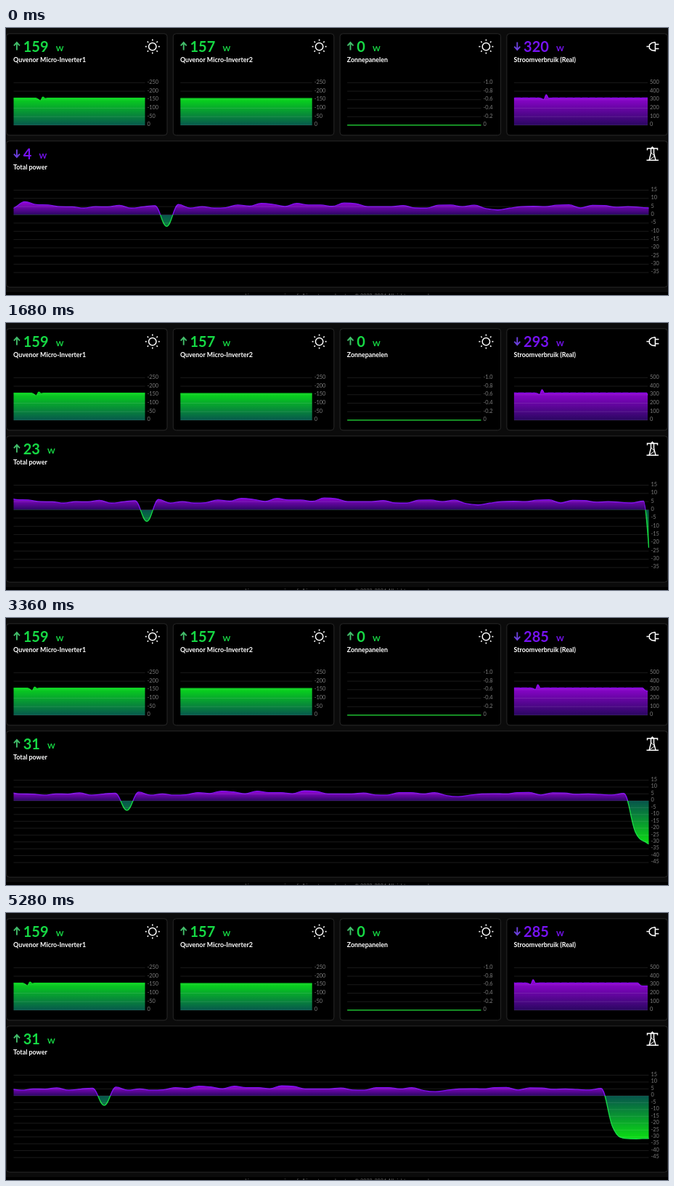
Write an HTML page with a canvas that moves like this. It is 912 px wide and 368 px high and loops after 5400 ms.

```html
<!DOCTYPE html>
<html lang="nl">
<head>
<meta charset="utf-8">
<title>Power dashboard</title>
<style>
  html, body { margin: 0; width: 912px; height: 368px; overflow: hidden; background: #0b0b0b; }
  canvas { display: block; }
</style>
</head>
<body>
<canvas id="stage" width="912" height="368"></canvas>
<script>
const ctx = document.getElementById('stage').getContext('2d');
const LOOP = 5400, STEP = 120;
const SAMPLE_MS = 1000;     // time between two measurements
const START = 40.76;        // sample index at the right edge when the loop starts
const SPAN = 53.7;          // samples across a chart
const RESCALE = 43;         // sample index at which the large axis grows
const FONT = 'Lato, sans-serif';
const GREEN = '#16d944', PURPLE = '#7612f2';

const clamp = v => Math.max(0, Math.min(1, v));
const mix = (a, b, p) => a + (b - a) * p;

// Total power in watts; the first entry is sample -14
const totals = [
  3.5, 4, 8, 6.2, 6, 5, 4.9, 4.1, 5, 4.9, 5.8, 4.1, 4.9, 5.6,
  -7, 6.3, 4.1, 5, 4.1, 4.4, 6, 5.3, 7, 6.4, 5.1, 7, 6, 6, 5.2,
  7.2, 6.8, 5, 5, 5, 5.7, 4.2, 4.1, 5.9, 6, 5, 5.9, 3.8, 3, 4.1, 5,
  5.2, 5, 5.9, 6.1, 4.2, 5.8, 5.7, 4.7, 5, 4.6, 4.2, 5.4,
  -23, -31, -31.4, -31, -31.4
];
const inverterBlip = { '-3': -153, '-2': -144, '-1': -166, '0': -157 };
const usageEvents = { '-2': 314, '-1': 303, '0': 360, '1': 317, '41': 320, '42': 321, '43': 293 };

const charts = [
  { title: 'Quvenor Micro-Inverter1', icon: sun, right: 191.5, hi: -250, lo: 0, ticks: 5,
    value: k => inverterBlip[k] ?? -159 },
  { title: 'Quvenor Micro-Inverter2', icon: sun, right: 421.7, hi: -250, lo: 0, ticks: 5,
    value: () => -157 },
  { title: 'Zonnepanelen', icon: sun, right: 654.5, hi: -1, lo: 0, ticks: 5, digits: 1,
    value: () => 0 },
  { title: 'Stroomverbruik (Real)', icon: plug, right: 884, hi: 500, lo: 0, ticks: 5,
    value: k => k > 43 ? 285 : usageEvents[k] ?? 320 + Math.sin(k * 2.1) }
].map((c, i) => ({ ...c, x: 1 + 229.8 * i, y: 8, w: 221, h: 140, top: 75.4, bottom: 133.9 }));

const totalChart = {
  x: 1, y: 156, w: 910.5, h: 201.4, title: 'Total power', icon: pylon,
  right: 885.5, top: 223.5, bottom: 337, hi: 15, lo: -35, ticks: 10, twoSided: true,
  value: k => totals[k + 14] ?? 4
};

function lines(width, ...paths) {
  ctx.lineWidth = width;
  ctx.beginPath();
  for (const [x, y, ...rest] of paths) {
    ctx.moveTo(x, y);
    for (let i = 0; i < rest.length; i += 2) ctx.lineTo(rest[i], rest[i + 1]);
  }
  ctx.stroke();
}

function text(str, x, y, size, color, weight = 400) {
  ctx.font = `${weight} ${size}px ${FONT}`;
  ctx.fillStyle = color;
  ctx.fillText(str, x, y);
  return ctx.measureText(str).width;
}

function sun(x, y) {
  ctx.lineWidth = 1.5;
  ctx.beginPath();
  ctx.arc(x, y, 5.2, 0, Math.PI * 2);
  ctx.stroke();
  for (let i = 0; i < 8; i++) {
    const c = Math.cos(i * Math.PI / 4), s = Math.sin(i * Math.PI / 4);
    lines(1.6, [x + 8 * c, y + 8 * s, x + 10 * c, y + 10 * s]);
  }
}

function plug(x, y) {
  lines(1.5, [x - 8, y, x - 4, y],
    [x + 4, y - 3, x + 9, y - 3], [x + 4, y + 3, x + 9, y + 3],
    [x + 4, y - 6, x + 4, y + 6, x - 1, y + 5, x - 4, y + 2.5, x - 4, y - 2.5, x - 1, y - 5, x + 4, y - 6]);
}

function pylon(x, y) {
  lines(1.5, [x - 7, y - 5, x - 7, y - 7.5, x + 7, y - 7.5, x + 7, y - 5],
    [x - 8, y + 8.7, x + 8.5, y + 8.7],
    [x - 2, y - 7.5, x, y - 9.5, x + 2, y - 7.5, x + 2, y - 1, x + 4.5, y + 8.5],
    [x - 2, y - 7.5, x - 2, y - 1, x - 4.5, y + 8.5]);
  lines(1, [x - 2, y - 2, x + 3, y + 3, x - 4, y + 8]);
}

function arrow(x, y, up) {
  const d = up ? 1 : -1;
  ctx.strokeStyle = up ? '#42bd6a' : '#6b40dc';
  lines(1.9, [x, y + 5.5 * d, x, y - 5 * d], [x - 4, y - 0.7 * d, x, y - 5 * d, x + 4, y - 0.7 * d]);
}

// Control points of a smoothed line that never overshoots its neighbours
function controls(prev, p, next) {
  const toward = (a, b) => (1.5 * a + b) / 2.5;
  const lx = toward(p.x, prev.x), rx = toward(p.x, next.x);
  let ly = toward(p.y, prev.y), ry = toward(p.y, next.y);
  if (rx !== lx) {
    const shift = (ry - ly) * (rx - p.x) / (rx - lx) + p.y - ry;
    ly += shift;
    ry += shift;
  }
  const bound = (v, a, b) => Math.max(Math.min(a, b), Math.min(Math.max(a, b), v));
  const left = bound(ly, prev.y, p.y);
  if (left !== ly) { ly = left; ry = 2 * p.y - ly; }
  const right = bound(ry, next.y, p.y);
  if (right !== ry) { ry = right; ly = 2 * p.y - ry; }
  return { lx, ly, rx, ry };
}

function smoothPath(pts) {
  const path = new Path2D();
  path.moveTo(pts[0].x, pts[0].y);
  let out = { rx: pts[0].x, ry: pts[0].y };
  for (let i = 1; i < pts.length; i++) {
    const p = pts[i], next = pts[i + 1];
    const c = next ? controls(pts[i - 1], p, next) : { lx: p.x, ly: p.y };
    path.bezierCurveTo(out.rx, out.ry, c.lx, c.ly, p.x, p.y);
    out = c;
  }
  return path;
}

function paintSeries(c, curve, pts, zero, from, to, stops, stroke, clipTop, clipBottom) {
  const left = c.x + 9.5;
  ctx.save();
  ctx.beginPath();
  ctx.rect(left, clipTop, c.right - left + 0.6, clipBottom - clipTop);
  ctx.clip();
  const area = new Path2D(curve);
  area.lineTo(pts[pts.length - 1].x, zero);
  area.lineTo(pts[0].x, zero);
  const fill = ctx.createLinearGradient(0, from, 0, to);
  stops.forEach((color, i) => fill.addColorStop(i, color));
  ctx.fillStyle = fill;
  ctx.fill(area);
  ctx.strokeStyle = stroke;
  ctx.lineWidth = 1.3;
  ctx.stroke(curve);
  ctx.restore();
}

function drawChart(c, now) {
  const newest = Math.floor(now) + 1;
  const grown = c.twoSided && now >= RESCALE;
  const lo = grown ? -45 : c.lo, ticks = grown ? 12 : c.ticks;
  const left = c.x + 9.5, spacing = (c.right - left) / SPAN;
  const toY = (v, low) => mix(c.bottom, c.top, (v - low) / (c.hi - low));
  const zero = toY(0, lo);

  ctx.fillStyle = '#000';
  ctx.strokeStyle = '#282828';
  ctx.lineWidth = 1;
  ctx.beginPath();
  ctx.roundRect(c.x - 0.5, c.y - 0.2, c.w + 0.5, c.h, 4);
  ctx.fill();
  ctx.stroke();

  const pts = [];
  for (let k = Math.floor(now - SPAN) - 1; k <= newest; k++) {
    let y = toY(c.value(k), lo);
    if (grown && k <= RESCALE) y = mix(toY(c.value(k), c.lo), y, clamp(now - RESCALE));
    pts.push({ x: Math.min(c.right, c.right - (now - k) * spacing), y });
  }
  const curve = smoothPath(pts);
  const crest = Math.min(...pts.map(p => p.y));
  const current = c.value(newest), producing = current <= 0;
  const purples = ['#9804da', '#2b0762'], greens = ['#08d81a', '#07594c'];

  if (c.twoSided) {
    paintSeries(c, curve, pts, zero, crest, zero, purples, '#8010f0', c.top, zero);
    paintSeries(c, curve, pts, zero, zero, 312, ['#07544c', '#0be012'], GREEN, zero, c.bottom);
  } else {
    paintSeries(c, curve, pts, zero, crest, Math.max(zero, crest + 1), producing ? greens : purples,
      producing ? '#10d828' : '#8c0af0', c.top - 2, c.bottom + 2);
  }

  ctx.strokeStyle = 'rgba(255,255,255,.1)';
  for (let i = 0; i <= ticks; i++) {
    const y = mix(c.top, c.bottom, i / ticks), v = mix(c.hi, lo, i / ticks);
    lines(1, [left, y, c.right, y]);
    const label = Math.abs(v) < 1e-6 ? '0' : v.toFixed(c.digits || 0);
    text(label, c.right + 3, y + 1.4, 7.4, '#7e7e7e');
  }

  const color = producing ? GREEN : PURPLE;
  arrow(c.x + 13.9, c.y + 17, producing);
  const width = text(String(Math.abs(Math.round(current))), c.x + 22.7, c.y + 24.5, 20, color, 700);
  text('W', c.x + 22.7 + width + 10.2, c.y + 24.2, 10.2, color, 700);
  text(c.title, c.x + 9.1, c.y + 39, 8.9, '#fff', 700);
  ctx.strokeStyle = '#fff';
  c.icon(c.x + c.w - (c.icon === sun ? 20.2 : 21), c.y + 17.6);
}

function draw(time) {
  const t = Math.floor(time % LOOP / STEP) * STEP;
  const now = START + t / SAMPLE_MS;
  ctx.fillStyle = '#0b0b0b';
  ctx.fillRect(0, 0, 912, 368);
  for (const c of charts) drawChart(c, now);
  drawChart(totalChart, now);
  ctx.fillStyle = '#000';
  ctx.fillRect(0, 364, 912, 4);
  ctx.textAlign = 'center';
  text('Live power overview of all inverters and meters © 2023-2024 All rights reserved', 456, 371.7, 7.2, '#666');
  ctx.textAlign = 'left';
}

const begin = performance.now();
function tick() {
  draw(performance.now() - begin);
  requestAnimationFrame(tick);
}
tick();
</script>
</body>
</html>
```
